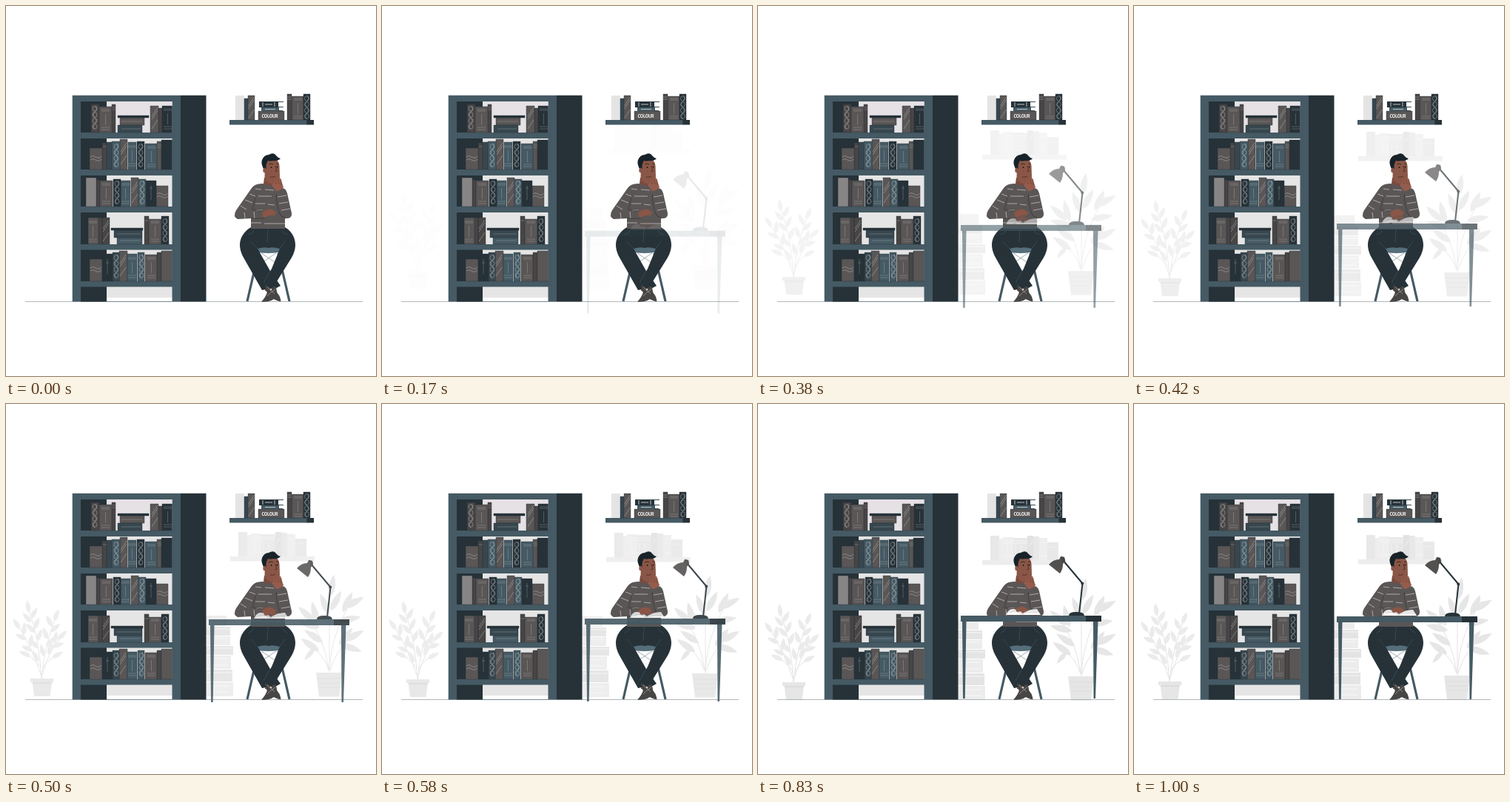
Write an HTML page without scripts that moves like this. It is 500 px wide and 500 px high and loops after 1.04 s.

```html
<!DOCTYPE html>
<html lang="en">
<head>
<meta charset="utf-8">
<title>Thinking at the desk</title>
<style>
html, body { margin: 0; width: 100%; height: 100%; overflow: hidden; background: #fff; }
svg { display: block; width: 100%; height: 100%; }
.blue { fill: #455a64; }
.dark { fill: #263238; }
.slate { fill: #37474f; }
.grey { fill: #5a5656; }
.coal { fill: #484545; }
.pale { fill: #e4e4e4; }
.skin { fill: #8a5647; }
.books path { stroke: #263238; stroke-width: .4; }
.marks { fill: none; stroke: #d6d9da; stroke-width: .5; opacity: .75; }
.fine { stroke-width: .45; opacity: .75; }
.far { --dir: -1; }
.near { --dir: 1; }
.far, .near { animation: settle 1040ms infinite; }
@keyframes settle {
  0% { opacity: 0; transform: translateY(calc(var(--dir) * 18px)); animation-timing-function: step-end; }
  12.5% { opacity: .02; transform: translateY(calc(var(--dir) * 18px)); animation-timing-function: steps(4); }
  27.88% { opacity: .38; transform: translateY(calc(var(--dir) * 12.5px)); animation-timing-function: steps(3); }
  40.38% { opacity: .68; transform: translateY(calc(var(--dir) * 7px)); animation-timing-function: steps(2); }
  48.07% { opacity: .86; transform: translateY(calc(var(--dir) * 4px)); animation-timing-function: steps(4); }
  64.42% { opacity: 1; transform: translateY(calc(var(--dir) * -.2px)); animation-timing-function: steps(4); }
  79.8% { opacity: 1; transform: translateY(calc(var(--dir) * -1px)); animation-timing-function: steps(4); }
  96.15%, 100% { opacity: 1; transform: none; }
}
</style>
</head>
<body>
<svg viewBox="0 0 500 500">
<defs>
  <path id="leaf" d="M0 0C4-3 4.500-10 0-17C-4.500-10-4-3 0 0Z"/>
  <path id="big" d="M0 0C6-6 6-18 0-30C-6-18-6-6 0 0Z"/>
  <g id="loops">
    <ellipse cx="5" cy="7" rx="3" ry="3.300"/>
    <ellipse cx="5" cy="15" rx="3" ry="3.300"/>
    <ellipse cx="5" cy="23" rx="3" ry="3.300"/>
    <ellipse cx="5" cy="31" rx="3" ry="3.300"/>
    <path d="M6 3Q9 7 5 11T5 19T5 27T5 35"/>
  </g>
  <path id="slash" d="M1 17L9 5M1 21L9 9M1 34L9 22"/>
  <path id="bands" d="M1 4H12M1 6H12M6.500 10V25M1 28H12M1 31H12"/>
  <path id="wave" d="M1 11Q4 8 8 11T16 10M1 15Q4 12 8 15T16 14"/>
</defs>

<g class="far">
  <!-- left plant -->
  <g fill="none" stroke="#e3e3e3" stroke-width="1">
    <path d="M48 376Q45 320 30 280M48 376Q52 330 67 292M47 370Q38 340 18 306M49 370Q58 335 76 318M47 360Q36 345 24 341M49 362Q57 348 70 343"/>
  </g>
  <g fill="#ebebeb">
    <use href="#leaf" transform="translate(31 286) rotate(-8)"/>
    <use href="#leaf" transform="translate(34 294) rotate(28)"/>
    <use href="#leaf" transform="translate(34 299) rotate(-42)"/>
    <use href="#leaf" transform="translate(38 308) rotate(24)"/>
    <use href="#leaf" transform="translate(39 313) rotate(-44)"/>
    <use href="#leaf" transform="translate(42 324) rotate(22)"/>
    <use href="#leaf" transform="translate(43 334) rotate(-42)"/>
    <use href="#leaf" transform="translate(65 297) rotate(22)"/>
    <use href="#leaf" transform="translate(62 305) rotate(-25)"/>
    <use href="#leaf" transform="translate(60 312) rotate(50)"/>
    <use href="#leaf" transform="translate(56 322) rotate(-20)"/>
    <use href="#leaf" transform="translate(54 332) rotate(42)"/>
    <use href="#leaf" transform="translate(51 345) rotate(-14)"/>
    <use href="#leaf" transform="translate(19 308) rotate(-34)"/>
    <use href="#leaf" transform="translate(24 316) rotate(4)"/>
    <use href="#leaf" transform="translate(28 322) rotate(-66)"/>
    <use href="#leaf" transform="translate(33 332) rotate(6)"/>
    <use href="#leaf" transform="translate(36 338) rotate(-64)"/>
    <use href="#leaf" transform="translate(70 322) rotate(46)"/>
    <use href="#leaf" transform="translate(65 328) rotate(12)"/>
    <use href="#leaf" transform="translate(62 332) rotate(74)"/>
    <use href="#leaf" transform="translate(57 343) rotate(18)"/>
    <use href="#leaf" transform="translate(33 345) rotate(-66)"/>
    <use href="#leaf" transform="translate(62 347) rotate(62)"/>
    <use href="#leaf" transform="translate(44 352) rotate(-30)"/>
  </g>
  <path fill="#e6e6e6" d="M33 375H64V380H62L59.500 399H38L35.500 380H33Z"/>
  <path fill="#dcdcdc" d="M36 380H62L61.500 382H36.300Z"/>

  <!-- right plant -->
  <g fill="none" stroke="#e3e3e3" stroke-width="1">
    <path d="M437 368V258M437 364Q440 310 470 266M436 362Q430 320 405 285M438 364Q446 335 470 316M436 364Q430 342 410 330"/>
  </g>
  <g fill="#e6e6e6">
    <use href="#big" transform="translate(438 264) rotate(10)"/>
    <use href="#big" transform="translate(439 283) rotate(28)"/>
    <use href="#big" transform="translate(436 288) rotate(-22)"/>
    <use href="#big" transform="translate(457 279) rotate(62)"/>
    <use href="#big" transform="translate(455 285) rotate(26)"/>
    <use href="#big" transform="translate(450 297) rotate(80)"/>
    <use href="#big" transform="translate(417 298) rotate(-48)"/>
    <use href="#big" transform="translate(424 306) rotate(-76)"/>
    <use href="#big" transform="translate(421 300) rotate(-15)"/>
    <use href="#big" transform="translate(428 326) rotate(-56)"/>
    <use href="#big" transform="translate(457 324) rotate(62)"/>
    <use href="#big" transform="translate(450 330) rotate(38)"/>
    <use href="#big" transform="translate(452 329) rotate(108)"/>
    <use href="#big" transform="translate(423 338) rotate(-55)"/>
    <use href="#big" transform="translate(417 334) rotate(-140) scale(.7)"/>
  </g>
  <path fill="#e6e6e6" d="M419 367H454L450 399.500H423Z"/>
  <path fill="none" stroke="#dadada" stroke-width=".8" d="M421 375H453M422 381H452M423 387H451"/>

  <!-- far wall shelf -->
  <path fill="#ededed" d="M303 210H417V216.500H303Z"/>
  <path fill="#e8e8e8" d="M314 177H326V210H314ZM345 180H364V210H345ZM372 178H380V210H372ZM391 186H406V210H391Z"/>
  <path fill="#eee" d="M326 181H331V210H326ZM331 179H345V210H331ZM380 180H391V210H380Z"/>
  <path fill="#e2e2e2" d="M364 177H372V210H364Z"/>
  <path fill="none" stroke="#fafafa" stroke-width=".6" d="M332 184H363M332 187H363M332 204H363M348 190V201M355 190V201M366 192L371 184M382 186H390M382 204H390M393 194Q398 190 404 194M337 190V200"/>

  <!-- floor pile -->
  <path fill="#ececec" d="M262 290H298V304H262ZM262 318H303V330H262ZM262 344H304V362H262ZM262 380H307V399H262Z"/>
  <path fill="#e4e4e4" d="M262 305H303V317H262ZM262 331H307V343H262ZM262 363H306V379H262Z"/>
  <path fill="none" stroke="#fafafa" stroke-width=".8" d="M272 308H303M276 321H300M272 334H306M276 348H300M276 357H300M272 367H305M276 385H302M276 393H302"/>
</g>

<path stroke="#8f999e" stroke-width=".7" d="M26 399.500H482"/>

<!-- bookcase -->
<path class="blue" d="M89.700 120.700H236V399.500H89.700Z"/>
<path class="dark" d="M236 120.700H270.500V399.500H236Z"/>
<path fill="#e5e5e5" d="M136 129H224.500V394H136Z"/>
<path fill="#e5e1e5" d="M136 129H224.500V171H136Z"/>
<path fill="#fff" d="M136 394H224.500V399H136Z"/>
<path class="dark" d="M101 129H136V399.500H101Z"/>
<path class="blue" d="M101 171H225V179H101ZM101 221H225V229H101ZM101 271H225V279H101ZM101 322H225V329.500H101ZM101 372H225V379.500H101Z"/>

<g class="books">
  <path class="coal" d="M115 133h11v38h-11zM143 133h5v38h-5zM206 138h5v33h-5zM130 185h6v36h-6zM122 235h5v36h-5zM125 286h5v36h-5zM130 286h10v36h-10zM187 284h6v38h-6zM204 333h6v39h-6z"/>
  <path class="grey" d="M126 136h17v35h-17zM195 135h11v36h-11zM154 151h33v10h-33zM113 192h17v29h-17zM154 180h10v41h-10zM204 183h6v38h-6zM127 236h17v35h-17zM169 232h10v39h-10zM203 243h16v28h-16zM111 286h14v36h-14zM193 288h17v34h-17zM113 342h17v30h-17zM153 331h11v41h-11zM188 336h16v36h-16zM210 331h14.500v41h-14.500z"/>
  <path class="blue" d="M143 183h11v38h-11zM165 184h11v37h-11zM188 186h16v35h-16zM155 236h13v35h-13zM179 234h10v37h-10zM164 335h13v37h-13zM178 333h9v39h-9zM150 313h34v9h-34z"/>
  <path class="slate" d="M151 161h33v10h-33zM136 184h7v37h-7zM146 303h38v10h-38zM144 333h9v39h-9z"/>
  <path class="dark" d="M211 135h13.500v36h-13.500zM151 148h42v3h-42zM177 183h10v38h-10zM210 181h14.500v40h-14.500zM145 234h10v37h-10zM189 236h14v35h-14zM142 300h43v3h-43zM210 284h10v38h-10zM130 335h14v37h-14z"/>
  <path fill="#878585" d="M108 232h14v39h-14z"/>
</g>
<g class="marks">
  <use href="#loops" x="115" y="132"/>
  <use href="#loops" x="144" y="183"/>
  <use href="#loops" x="177" y="183"/>
  <use href="#loops" x="145" y="233"/>
  <use href="#loops" x="179" y="233"/>
  <use href="#loops" x="210" y="284"/>
  <use href="#loops" x="144" y="333"/>
  <use href="#loops" x="178" y="333"/>
  <use href="#slash" x="196" y="132"/>
  <use href="#slash" x="154" y="180"/>
  <use href="#slash" x="169" y="232"/>
  <use href="#slash" x="130" y="284"/>
  <use href="#slash" x="153" y="331"/>
  <use href="#wave" x="113" y="193"/>
  <use href="#wave" x="203" y="243"/>
  <use href="#wave" x="113" y="343"/>
  <g class="fine">
    <use href="#bands" x="128" y="136"/>
    <use href="#bands" x="212" y="135"/>
    <use href="#bands" x="164" y="185"/>
    <use href="#bands" x="190" y="186"/>
    <use href="#bands" x="129" y="236"/>
    <use href="#bands" x="155" y="236"/>
    <use href="#bands" x="111" y="287"/>
    <use href="#bands" x="195" y="287"/>
    <use href="#bands" x="164" y="336"/>
    <use href="#bands" x="190" y="336"/>
    <path d="M143 137H148M143 140H148M204 188H210M204 191H210M196 242V262M194 246H198M137 342V362M135 347H139M187 290H193M156 156H184M156 166H182M150 308H182M154 317H181M131 190H136"/>
  </g>
</g>

<!-- wall shelf -->
<path class="blue" d="M302 154H407V160.500H302Z"/>
<path class="dark" d="M406.500 154H416V160.500H406.500Z"/>
<g class="books">
  <path style="stroke:none" class="pale" d="M310 121h12v33h-12z"/>
  <path class="slate" d="M322 125h5v29h-5z"/>
  <path class="grey" d="M327 121h9v33h-9zM341 142h35v12h-35zM386 122h16v32h-16z"/>
  <path class="dark" d="M402 119h9v35h-9z"/>
  <path class="coal" d="M380 119h6v35h-6z"/>
</g>
<!-- lying books: spine, pages, covers -->
<path class="dark" d="M342 129H368V137H342Z"/>
<path class="blue" d="M345 137H369V142H345Z"/>
<path fill="none" stroke="#263238" stroke-width=".9" d="M367 129.500H375M367 136.500H375M368 141.500H374"/>
<path fill="none" stroke="#dfe2e3" stroke-width=".8" d="M347 130V136M363 130V136M350 133H360M350 139.500H364"/>
<g class="marks">
  <use href="#loops" x="401.500" y="118"/>
  <use href="#slash" x="326.500" y="118"/>
  <use href="#bands" class="fine" x="388" y="121"/>
  <path d="M380 123H386M380 126H386"/>
</g>
<text x="356.500" y="150.500" text-anchor="middle" font-family="'Noto Sans CJK SC','Noto Sans CJK JP',Lato,sans-serif" font-size="5.600" font-weight="700" letter-spacing="-.2" fill="#fff">COLOUR</text>

<!-- chair -->
<g fill="none">
  <path stroke="#455a64" stroke-width="3.200" d="M341 334L326 399M368 334L383 399"/>
  <path stroke="#8b979d" stroke-width=".8" d="M345 334L366 348M365 334L344 348"/>
</g>
<path fill="#546e7a" d="M337 325H373L369 333Q354 335 340 333Z"/>

<!-- legs -->
<path class="skin" d="M350 377L364 376L362 386L350 385Z"/>
<path class="dark" d="M377 299C386 304 391 313 391 323Q391 331 386 340L358 385L345 379L359 355L370 328Q361 325 354 327V299Z"/>
<path class="dark" d="M331 299C322 304 316 313 316 323Q316 331 321 340L346 384L355 382L358 374L362 383L371 378L357 358L340 328Q348 325 356 327V299Z"/>
<path fill="none" stroke="#41525b" stroke-width=".7" d="M354 301L353 320M340 328Q334 322 331 318M370 328Q374 322 377 318M357 358L348 374M335 303Q333 308 328 309M373 303Q375 308 380 309"/>
<path class="coal" d="M351 377Q358 382 364 385Q371 391 371.500 399.500Q361 398 355 390Q349 384 351 377Z"/>
<path class="coal" d="M363 378Q358 383 353 387Q350 395 345 399.500Q359 401 365 393Q368 385 363 378Z"/>
<path fill="none" stroke="#b9b5b3" stroke-width=".6" d="M353 380L363 389M364 383Q357 387 353 392"/>
<circle cx="358" cy="383" r="1.300" fill="#d5c6bf"/>

<!-- sweater -->
<path class="grey" d="M346 240Q336 240 332 246L311 276Q306 285 313 288L331 287V301H377V287Q387 288 386 280L380 253Q378 246 373 246L362 241Z"/>
<g fill="none" stroke="#d2cdca" stroke-width=".7">
  <path d="M337 247L345 248M350 248L362 249M329 254L337 257M341 257H359M367 258L379 256M323 262L333 266M337 267H350M354 268L363 269M369 267L381 265M317 270L325 275M338 276H347M372 276L384 274M331 293H345M349 294H377M322 279L323 287M335 278L336 287"/>
  <path stroke="#383432" d="M337 259L333 275L347 277M331 287H350M365 254Q366 272 371 283L378 287"/>
</g>
<path class="skin" d="M346 279Q353 273 360 275L365 279L363 283L356 283L348 286Z"/>

<!-- head -->
<path fill="#7b4b3e" d="M349 232H363V240Q357 245 348 240Z"/>
<path class="skin" d="M350 211Q354 207 360 207Q369 207 369.500 216L370 231Q369 240 361 240.500Q352 240 349.500 232Z"/>
<path fill="#172329" d="M349 222Q344 213 346 208Q349 201 355 201Q362 197 365 202Q367 205 371 206Q367 210 361 209Q357 210 354 209Q351 213 351.500 221Z"/>
<ellipse class="skin" cx="349.500" cy="222" rx="2.200" ry="3.300"/>
<g fill="none" stroke="#2b1c18" stroke-width=".8">
  <path d="M355 214Q358 212 361 214M365.500 213L368.500 214"/>
  <path stroke-width=".6" d="M364 216L366 223L363 224M357 231Q361 232 364 230"/>
</g>
<circle cx="358.500" cy="218" r=".9" fill="#1c1513"/>
<circle cx="366.500" cy="217.500" r=".9" fill="#1c1513"/>
<path fill="#945c4d" d="M359 242L363 238Q367 235 369 232Q372 232 373 239L375 245Q371 250 365 250Z"/>
<path fill="none" stroke="#6d3e31" stroke-width=".6" d="M363 240L367 239M368 235L369 241M371.500 237L372 242"/>

<g class="near">
  <path fill="#e8e8e8" d="M335 286Q339 277 345 278Q353 279 358 284Q366 278 377 278L382 286Z"/>
  <path fill="#fff" d="M338 284Q346 278 357 284.500Q366 279 380 283L381 286H337Z"/>
  <path fill="none" stroke="#9aa1a4" stroke-width=".5" d="M341 283Q348 279 357 285Q366 281 378 283"/>
  <path class="skin" d="M348 279Q353 273 360 275L365 279L362 282L356 281L350 282Z"/>
  <path class="blue" d="M276 295H281.500L279.700 399H277Z"/>
  <path class="blue" d="M453 295H459.500L456 399H453.500Z"/>
  <path class="blue" d="M274 287H444V295H274Z"/>
  <path class="dark" d="M443 287H464V295H443Z"/>
  <!-- lamp -->
  <path class="dark" d="M420 287Q420 282 430 282Q441 282 441 287Z"/>
  <path fill="none" stroke="#263238" stroke-width="2" stroke-linejoin="round" d="M434 284L438.500 243.500L412 212"/>
  <circle class="dark" cx="438.300" cy="243.500" r="1.900"/>
  <path fill="#535050" d="M393 218Q399 211 407 211L409 207L414 208L415 213L412 217Q412 225 408 230Z"/>
  <path class="coal" d="M409 207L414 208L415 213L412 216Z"/>
</g>
</svg>
</body>
</html>
```
